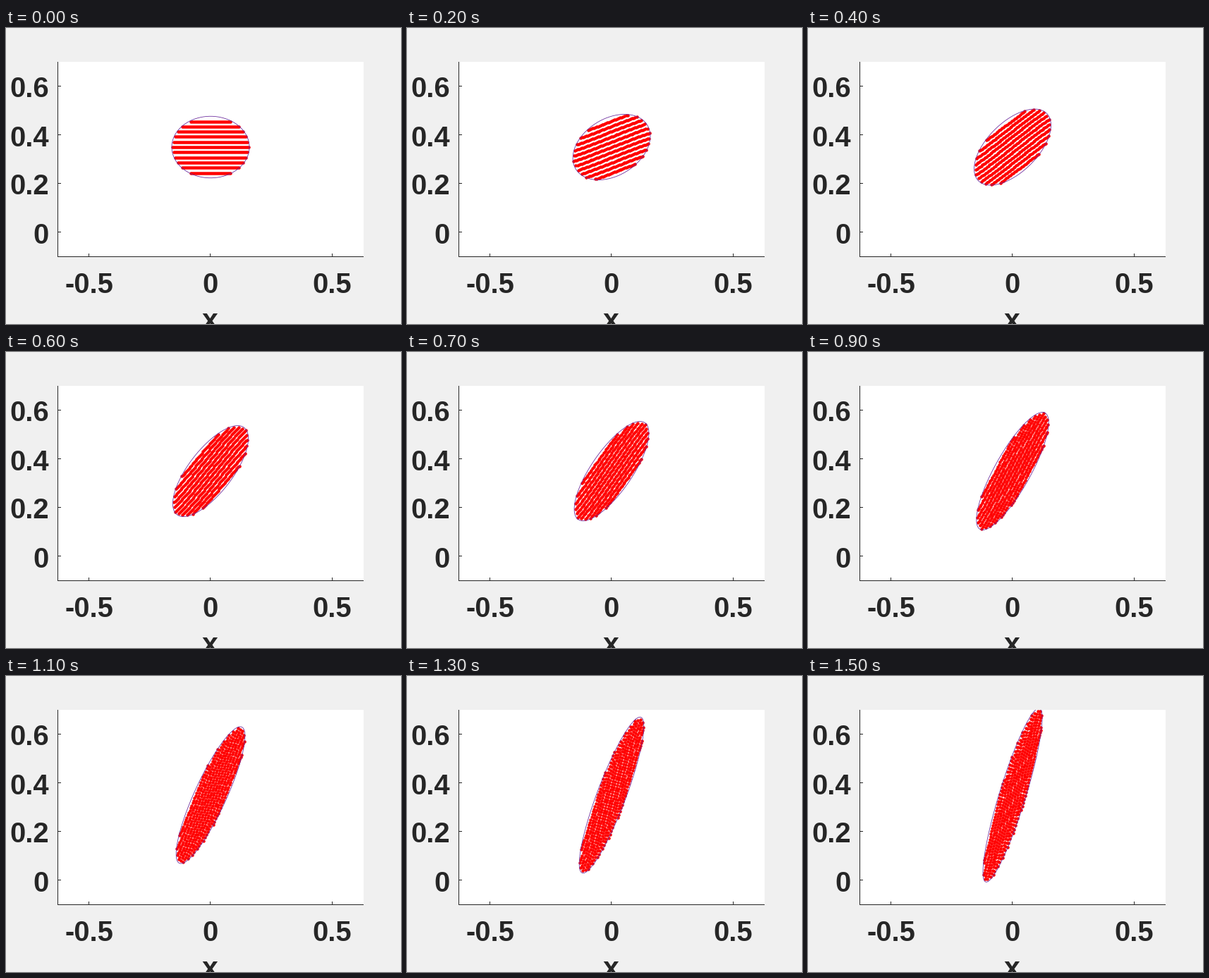
A matplotlib script for the animation above (1.6 s loop, 560 by 420 pixels).

```python
import numpy as np
import matplotlib.pyplot as plt
from matplotlib.animation import FuncAnimation
from matplotlib.patches import Rectangle

W, H, DPI = 560, 420, 100
STEPS, INTERVAL = 16, 100
PT = 72 / DPI                      # points per pixel
INK = "#262626"
UNIT = 345                         # pixels per data unit
X0, Y0 = 289.9, 289.75             # pixel position of the data origin
LEFT, RIGHT, TOP, BASE = 73.5, 507, 48, 324.5
CX, CY = 290, 169.0                # drop centre
RX, RY = 55.0, 43.75               # drop semi-axes at rest

fig = plt.figure(figsize=(W / DPI, H / DPI), dpi=DPI, facecolor="#f0f0f0")
ax = fig.add_axes([0, 0, 1, 1])
ax.set_xlim(0, W)
ax.set_ylim(H, 0)
ax.axis("off")

plot_area = Rectangle((LEFT - 0.5, TOP), RIGHT - LEFT + 0.5, BASE - TOP + 0.5,
                      fc="white", ec="none", zorder=0)
ax.add_patch(plot_area)


def stroke(xs, ys):
    ax.plot(xs, ys, color=INK, lw=PT, solid_capstyle="butt", zorder=5,
            snap=False)


def label(x, y, text, size=40, ha="center"):
    ax.text(x, y, text, fontsize=size * PT, family="Liberation Sans",
            weight="bold", color=INK, ha=ha, va="baseline")


def mid_pixel(p):
    return np.floor(p) + 0.5


stroke([LEFT, LEFT], [TOP, BASE + 0.5])
stroke([LEFT, RIGHT], [BASE, BASE])
for value, text in ((-0.5, "-0.5"), (0, "0"), (0.5, "0.5")):
    x = mid_pixel(X0 + value * UNIT)
    stroke([x, x], [BASE - 4.5, BASE])
    label(x, 376, text)
for value, text in ((0, "0"), (0.2, "0.2"), (0.4, "0.4"), (0.6, "0.6")):
    y = mid_pixel(Y0 - value * UNIT)
    stroke([LEFT, LEFT + 4.5], [y, y])
    label(61, y + 16, text, ha="right")
label(289.5, 427, "x", size=41)

# Tracer rows and outline, in coordinates where the resting drop is a unit disc
cols = np.arange(-27, 28) * 2.0 / RX
rows = np.arange(-5, 6) * 7.3 / RY
u, v = (g.ravel() for g in np.meshgrid(cols, rows))
inside = np.hypot(u, v) <= 0.99
u, v = u[inside], v[inside]
angle = np.linspace(0, 2 * np.pi, 241)
rim_u, rim_v = np.cos(angle), np.sin(angle)


def deform(u, v, t):
    """Shear the drop at step t while its inside turns, slower near the rim."""
    hx = RX - 13 * (t / 15) ** 2.4
    hy = np.hypot(RY, 7.9 * t) - 3 * (t / 15) ** 8
    s = min(1, RX * RY / (hx * hy))        # area is kept
    r = np.sqrt(1 - s * s)
    turn = 0.056 * t + 0.01 * t * (1 - (u * u + v * v) ** 2)
    c, n = np.cos(turn), np.sin(turn)
    p, q = u * c - v * n, u * n + v * c
    return CX + hx * p, CY - hy * (r * p + s * q)


dots, = ax.plot([], [], "o", ms=4.5 * PT, mew=0, color="red", zorder=2)
rim, = ax.plot([], [], color="#6a2a9c", lw=0.8 * PT, zorder=3)
for artist in (dots, rim):
    artist.set_clip_path(plot_area)


def update(t):
    dots.set_data(*deform(u, v, t))
    rim.set_data(*deform(rim_u, rim_v, t))
    return dots, rim


anim = FuncAnimation(fig, update, frames=STEPS, interval=INTERVAL,
                     repeat=True, repeat_delay=0)
plt.show()
```
